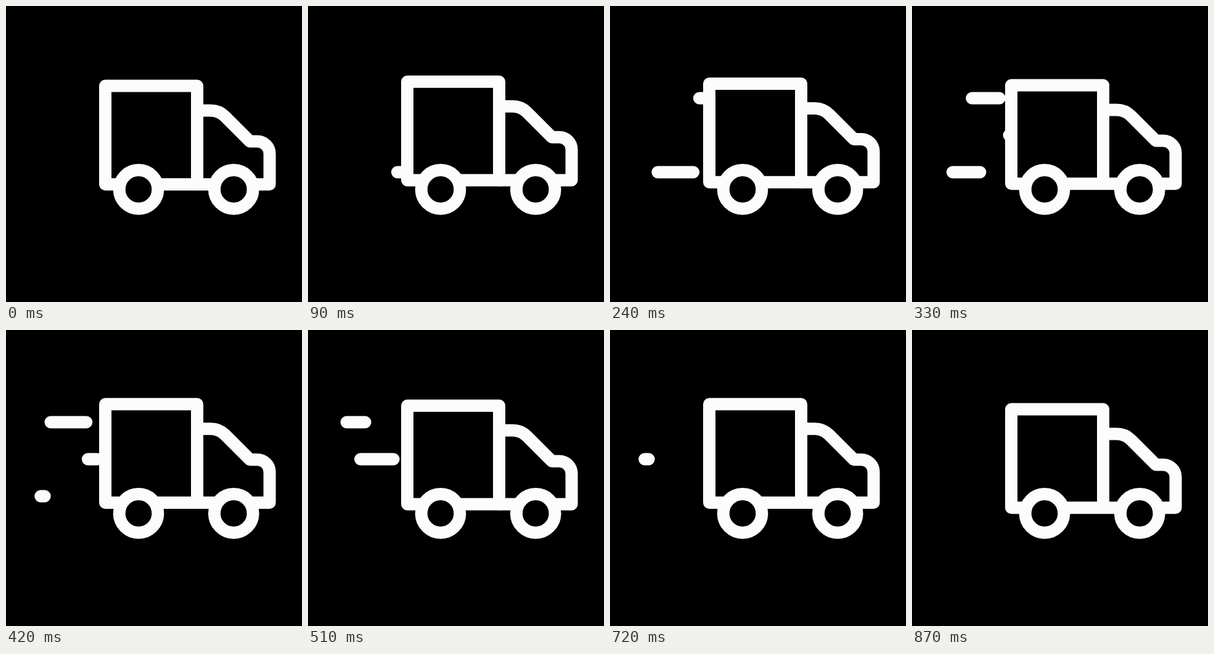
Recreate the animation shown at these times as an HTML page. Size 480 px wide and 480 px high, loop 900 ms.

```html
<!DOCTYPE html>
<html lang="en">
<head>
<meta charset="utf-8">
<title>Delivery truck</title>
<style>
  html, body { margin: 0; width: 100%; height: 100%; overflow: hidden; background: #000; }
  svg { display: block; width: 100vw; height: 100vh; }
  g { fill: none; stroke: #fcfcfc; stroke-width: 20; stroke-linecap: round; stroke-linejoin: round; }
  .wheels { fill: #000; }
</style>
</head>
<body>
<svg viewBox="0 0 480 480">
  <g id="streaks">
    <path data-y="269.5" data-delay="0"/>
    <path data-y="149.5" data-delay="5"/>
    <path data-y="209.5" data-delay="10"/>
  </g>
  <g id="body">
    <path d="M161 129.6H310V289.2H161Z"/>
    <path d="M310 169.5H332A32.5 32.5 0 0 1 355 179L395.5 219.5H407.5A20 20 0 0 1 427.5 239.5V289.2H310"/>
  </g>
  <g class="wheels">
    <circle cx="215" cy="297.4" r="31.3"/>
    <circle cx="369.2" cy="297.4" r="31.3"/>
  </g>
</svg>
<script>
  const LOOP = 900, STEP = 30;
  const HOP = 10.3, HOP_STEPS = 10;
  const START_X = 161, LENGTH = 60, DRIFT = 3.2;
  const GROW = 10, SHRINK_AT = 7, LIFE = 17;

  const body = document.getElementById('body');
  const streaks = [...document.querySelectorAll('#streaks path')];

  // Cubic ease-in-out, clamped to 0..1
  const ease = t => {
    t = Math.min(1, Math.max(0, t));
    return t < 0.5 ? 4 * t ** 3 : 1 - 4 * (1 - t) ** 3;
  };

  function drawStreak(el, step) {
    const age = step - el.dataset.delay;
    if (age <= 0 || age >= LIFE) {
      el.removeAttribute('d');
      return;
    }
    const x = START_X - DRIFT * age;
    const left = x - LENGTH * ease(age / GROW);
    const right = x - LENGTH * ease((age - SHRINK_AT) / GROW);
    el.setAttribute('d', `M${right} ${el.dataset.y}H${left}`);
  }

  function draw(now) {
    const step = Math.floor((now % LOOP) / STEP);
    const lift = HOP * (1 - Math.cos(2 * Math.PI * step / HOP_STEPS)) / 2;
    body.setAttribute('transform', `translate(0 ${-lift})`);
    streaks.forEach(el => drawStreak(el, step));
  }

  const begin = performance.now();
  function tick() {
    draw(performance.now() - begin);
    requestAnimationFrame(tick);
  }
  tick();
</script>
</body>
</html>
```
